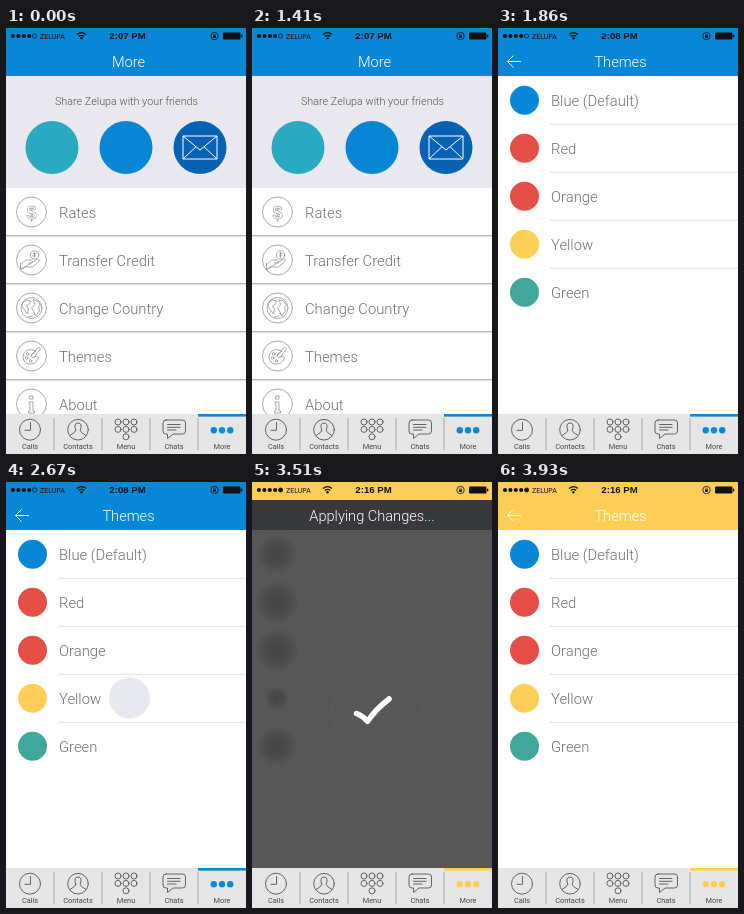
An HTML page that plays this animation: 240x426 px, repeating every 5.43 s.

```html
<!DOCTYPE html>
<html lang="en">
<head>
<meta charset="utf-8">
<title>Theme settings</title>
<style>
html, body { margin: 0; width: 100%; height: 100%; overflow: hidden; background: #fff; }
svg { display: block; width: 240px; height: 426px; }
text { font-family: Roboto, "Liberation Sans", Arial, sans-serif; font-weight: 300; }
.page { --theme: #0787d5; }
.theme { fill: var(--theme); }
.title { font-size: 14.6px; fill: #fff; text-anchor: middle; }
.label { font-size: 14.8px; fill: #6f6f6f; }
.share { font-size: 10.8px; fill: #555; text-anchor: middle; }
.carrier { font-size: 7px; font-weight: 400; fill: #111; }
.clock { font: bold 9.6px "Liberation Sans", Arial, sans-serif; text-anchor: middle; fill: #111; }
.tab { font-size: 7.4px; font-weight: 400; fill: #444; text-anchor: middle; }
.line { fill: none; stroke: #929292; stroke-width: .8; stroke-linecap: round; stroke-linejoin: round; }
.dark { fill: none; stroke: #555; stroke-width: .9; stroke-linecap: round; stroke-linejoin: round; }
.glyph { font: bold 18px "Liberation Sans", Arial, sans-serif; text-anchor: middle; fill: none; stroke: #929292; stroke-width: .6; }
</style>
</head>
<body>
<svg id="stage" viewBox="0 0 240 426"></svg>
<script>
const LOOP = 5430, STEP = 30;
const ROW = 48;

const circle = (x, y, r, attrs) => `<circle cx="${x}" cy="${y}" r="${r}" ${attrs}/>`;
const path = (d, cls) => `<path d="${d}" class="${cls}"/>`;
const text = (x, y, cls, s) => `<text x="${x}" y="${y}" class="${cls}">${s}</text>`;
const rect = (x, y, w, h, attrs) => `<rect x="${x}" y="${y}" width="${w}" height="${h}" ${attrs}/>`;

function statusBar(time) {
  const dots = [0, 1, 2, 3, 4].map(i => circle(7 + i * 5.4, 8, 2.1,
    i < 4 ? 'fill="#111"' : 'class="signal" fill="none" stroke="#111" stroke-width=".7"')).join('');
  return dots + text(34, 10.6, 'carrier', 'ZELUPA') +
    `<g fill="none" stroke="#111" stroke-width="1.3">
       <path d="M71 6.4Q75.5 2.8 80 6.4M72.8 8.4Q75.5 6.2 78.2 8.4"/></g>` +
    circle(75.5, 10.2, 1.2, 'fill="#111"') +
    text(121.5, 11.4, 'clock', time) +
    circle(208.5, 8, 3.7, 'fill="none" stroke="#111" stroke-width=".8"') +
    rect(207, 7.5, 3, 2.3, 'fill="#111"') +
    `<path d="M207.6 7.6V6.5Q208.5 5.2 209.4 6.5V7.6" fill="none" stroke="#111" stroke-width=".6"/>` +
    rect(217, 4.6, 17.5, 6.8, 'rx="1.2" fill="#111"') + rect(235, 6.6, 1.3, 2.8, 'rx=".6" fill="#111"');
}

function header(title, time) {
  return rect(0, 0, 240, 48, 'class="theme"') + statusBar(time) + text(122.5, 38.6, 'title', title);
}

function tabBar() {
  const names = ['Calls', 'Contacts', 'Menu', 'Chats', 'More'];
  const labels = names.map((n, i) => text(24 + i * 48, 420.8, 'tab', n)).join('');
  const dividers = [1, 2, 3, 4].map(i => rect(i * 48 - .5, 390, 1, 32, 'fill="#aaa"')).join('');
  const keys = [];
  for (let i = 0; i < 7; i++) {
    const x = i < 6 ? 112 + i % 3 * 8 : 120;
    keys.push(circle(x, 394 + Math.floor(i / 3) * 7.4, 3, 'class="dark"'));
  }
  const more = [207.8, 216, 224.2].map(x => circle(x, 402.3, 3.2, 'class="theme"')).join('');
  return rect(0, 386, 240, 40, 'fill="#e5e5e5"') + dividers +
    rect(192, 386, 48, 2.6, 'class="theme"') + labels +
    circle(24, 401.7, 10.5, 'class="dark"') + path('M24.5 394.5V402.3H19', 'dark') +
    circle(72, 401.7, 10.3, 'class="dark"') +
    path('M69.8 402.5Q67.2 395 72 395Q76.8 395 74.2 402.5Q74.2 404.3 79.5 407.2M69.8 402.5Q69.8 404.3 64.5 407.2', 'dark') +
    keys.join('') +
    path('M160 392H176.500Q179.500 392 179.500 395V403Q179.500 406 176.500 406H167L161.500 410.500V406H160Q157 406 157 403V395Q157 392 160 392ZM161.500 396.500H174M161.500 399.300H174M161.500 402H170', 'dark') +
    more;
}

// Icons are drawn around the centre of their row.
const icons = [
  `<text y="6.500" class="glyph">$</text>`,
  path('M-10 4L-6 0H0Q2 1 0 3H-3M0 3L6 -1Q9 -1 7 2L1 7H-6L-10 9ZM-11 3V10', 'line') +
    circle(3, -5, 4.2, 'class="line"') + path('M3 -7.500V-2.500M4.500 -6.500H2L4 -4H1.500', 'line'),
  circle(0, 0, 10.5, 'class="line"') +
    path('M-9 -5L-5 -8L-1 -7L-2 -4L-5 -2L-3 1L-4 6L-7 2L-9 -1ZM2 -8L6 -7L9 -3L7 -1L8 3L4 8L2 3L0 0L3 -3ZM-3 9L1 8', 'line'),
  path('M4 -5Q-4 -9 -8 -2Q-10 6 -3 8Q4 9 7 2Q7 -1 3 1Q-1 3 0 -1ZM0 -1L7 -9L9 -7L3 1', 'line') +
    circle(-4, -2, 1.3, 'class="line"') + circle(-5, 2, 1.3, 'class="line"') + circle(-1, 5, 1.3, 'class="line"'),
  path('M-2 -2H1.500V7H3V9H-3V7H-1.500V0H-2ZM-1.500 -8H1.500V-5H-1.500Z', 'line')
];

function morePage() {
  const rows = ['Rates', 'Transfer Credit', 'Change Country', 'Themes', 'About'].map((name, i) => {
    const y = 184 + i * ROW;
    return `<g transform="translate(25.5 ${y})">${circle(0, 0, 15, 'class="line"')}${icons[i]}</g>` +
      text(53, y + 5.6, 'label', name) +
      (i < 4 ? rect(0, y + 23.3, 240, 1, 'fill="#999"') : '');
  }).join('');
  const badges = ['#2aa9c1', '#0787d3', '#0762b4']
    .map((c, i) => circle(46 + i * 74, 119.5, 26.5, `fill="${c}"`)).join('');
  return rect(0, 0, 240, 426, 'fill="#fff"') + header('More', '2:07 PM') +
    rect(0, 48, 240, 112, 'fill="#e9e8ef"') +
    text(120.5, 76.6, 'share', 'Share Zelupa with your friends') + badges +
    `<path d="M177 108H211V131H177ZL194 122L211 108M177 131L190 118.700M211 131L198 118.700" fill="none" stroke="#fff" stroke-width="1"/>` +
    rows + tabBar();
}

function themesPage() {
  const themes = [['Blue (Default)', '#0787d5'], ['Red', '#e54d47'], ['Orange', '#e54d47'],
    ['Yellow', '#fecf57'], ['Green', '#42a79b']];
  const rows = themes.map(([name, color], i) => {
    const y = 72.2 + i * ROW;
    return circle(26.5, y, 14.5, `fill="${color}"`) + text(53, y + 5.6, 'label', name) +
      (i < 4 ? rect(52, y + 23.6, 188, 1, 'fill="#dedede"') : '');
  }).join('');
  return rect(0, 0, 240, 426, 'fill="#fff"') + header('Themes', '2:08 PM') +
    `<path d="M23 33.500H9.500M15.500 27.500L9.500 33.500L15.500 39.500" fill="none" stroke="#fff" stroke-width=".9"/>` +
    rows + tabBar();
}

function notice() {
  const blurs = [20, 22, 22, 12, 20]
    .map((r, i) => circle(25, 72 + i * ROW, r, 'fill="url(#shade)"')).join('');
  return rect(0, 18, 240, 368, 'fill="#575757"') + blurs +
    rect(0, 18, 240, 30, 'fill="#37393d"') + text(120, 39, 'title', 'Applying Changes...') +
    circle(121, 229, 45, 'fill="none" stroke="#4b4b4b" stroke-width=".8" stroke-dasharray="2 3"') +
    `<path d="M104.500 231.500Q111 234 115.500 239.300Q124 227 137 217" fill="none" stroke="#fff" stroke-width="5.500" stroke-linecap="round" stroke-linejoin="round"/>`;
}

const stage = document.getElementById('stage');
stage.innerHTML = `<defs><radialGradient id="shade">
    <stop offset="0" stop-color="#333" stop-opacity=".5"/>
    <stop offset=".55" stop-color="#333" stop-opacity=".35"/>
    <stop offset="1" stop-color="#333" stop-opacity="0"/></radialGradient></defs>
  <g id="more" class="page">${morePage()}</g>
  <g id="themes" class="page">${themesPage()}</g>
  <circle id="tap" fill="#e8e8ef"/>
  <g id="notice">${notice()}</g>`;

const [more, themes, tap, overlay] = ['more', 'themes', 'tap', 'notice'].map(id => document.getElementById(id));
const clock = themes.querySelector('.clock');
const signal = themes.querySelector('.signal');

// Each key holds time, radius and opacity.
const taps = [
  { y: 327.5, keys: [[870, 16, .3], [990, 20.5, 1], [1230, 20.5, 1], [1410, 24.5, 0]] },
  { y: 216, keys: [[2670, 20.5, 1], [2700, 20.5, 1], [2880, 24.5, 0]] }
];

const ramp = (t, from, to) => Math.min(1, Math.max(0, (t - from) / (to - from)));

function tapState(t) {
  for (const { y, keys } of taps) {
    for (let i = 1; i < keys.length; i++) {
      const a = keys[i - 1], b = keys[i];
      if (t < a[0] || t >= b[0]) continue;
      const p = ramp(t, a[0], b[0]);
      return { y, r: a[1] + (b[1] - a[1]) * p, alpha: a[2] + (b[2] - a[2]) * p };
    }
  }
  return { y: 0, r: 0, alpha: 0 };
}

function draw(t) {
  const x = 240 * ramp(t, 1620, 1860);
  more.setAttribute('transform', `translate(${-x} 0)`);
  themes.setAttribute('transform', `translate(${240 - x} 0)`);

  const yellow = t >= 3360;
  themes.style.setProperty('--theme', yellow ? '#fecd55' : '#0787d5');
  clock.textContent = yellow ? '2:16 PM' : '2:08 PM';
  signal.setAttribute('fill', yellow ? '#111' : 'none');

  const { y, r, alpha } = tapState(t);
  tap.setAttribute('cx', 123.5);
  tap.setAttribute('cy', y);
  tap.setAttribute('r', r);
  tap.setAttribute('opacity', alpha);

  overlay.setAttribute('opacity', ramp(t, 3390, 3510) - ramp(t, 3810, 3930));
}

const start = performance.now();
function tick() {
  const t = (performance.now() - start) % LOOP;
  draw(Math.floor(t / STEP) * STEP);
  requestAnimationFrame(tick);
}
tick();
</script>
</body>
</html>
```
